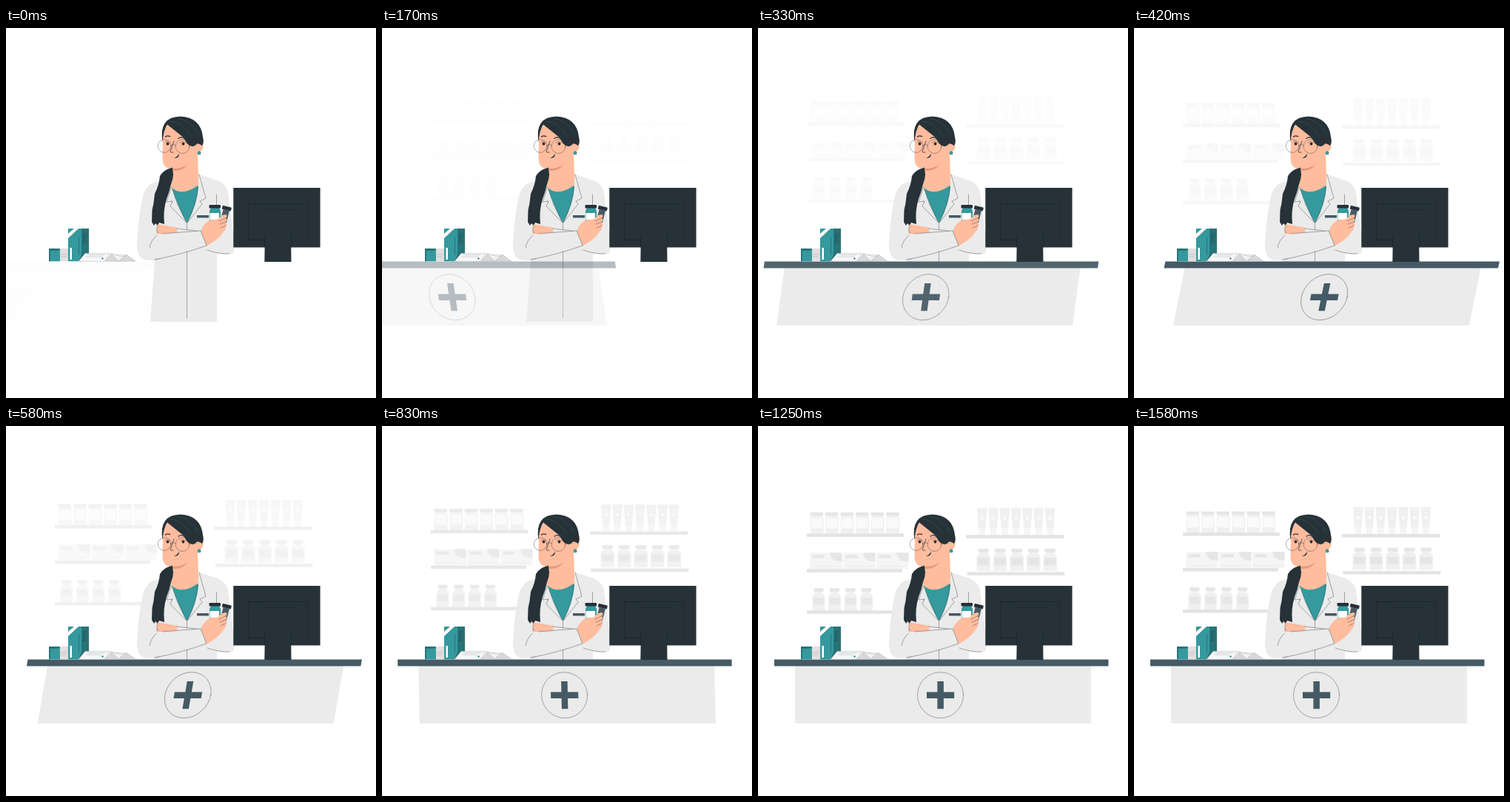
Recreate the animation shown at these times as an HTML page. Size 500x500 px, loop 1.62 s.

```html
<!DOCTYPE html>
<html lang="en">
<head>
<meta charset="utf-8">
<title>Pharmacy counter</title>
<style>
  html, body { margin: 0; width: 100%; height: 100%; overflow: hidden; background: #fff; }
  svg { display: block; width: 100%; height: 100%; }
  .dark { fill: #263238; }
  .slate { fill: #455a64; }
  .teal { fill: #35999d; }
  .skin { fill: #ffbd9e; }
  .coat { fill: #ebebeb; }
  .line { fill: none; stroke: #263238; stroke-width: .4; stroke-linecap: round; stroke-linejoin: round; }
  .soft { stroke: #8a9499; }
  .etch { stroke: #10191d; }
</style>
</head>
<body>
<svg viewBox="0 0 500 500">
  <g id="shelves"></g>

  <g id="woman">
    <path class="coat" d="M224 204 Q206 206 197 210 Q187 215 184 232 Q178 262 177 294 Q177 308 184 312 Q190 315 201 313.500 L195 397 H285 V304.500 Q300 307 307 304 Q309 300 308 284 L300 222 Q297 210 286 206 L262 198 Z"/>
    <path class="skin" d="M222 185 L259 168 L260 200 L262 220 L244 240 L222 219 Z"/>
    <path fill="#e8967a" d="M224 189 Q238 190 245 184 Q240 193 227 193 Z"/>
    <path class="teal" d="M224 216 Q238 228 259 213 L263 229 L245 263 L224 240 Z"/>
    <path class="coat" d="M223 213 L217 235 L225 234 L222 241 L244 263 Q231 239 224 215 Z M260 197 L270 230 L262 234 L265 238 L245 263 Q258 238 260 215 Z"/>
    <path class="line" d="M223.500 215 L217 235 L225 234 L222 241 L244 263 Q231 240 224 216 M261 198 L270 230 L262 234 L265 238 L245 263 Q258 238 259.500 214"/>
    <path class="line" d="M244.500 263 V392 M284.500 225 V239"/>
    <path class="slate" d="M258 253 H274 V256.500 H258 Z"/>

    <path class="skin" d="M212 140 L211.500 177 Q212 190 224 190 Q240 191 250 180 Q257 175 258 167 Q265 168 266.500 161 Q267 155 258 155 L244 132 L222 126 Z"/>
    <path class="dark" d="M211.500 154 Q206 120 236 119.500 Q263 121 266 147 Q268 155 265 159 Q260 155 257 157 Q255 161 250 159.500 Q244 158 241 149 Q230 140 218 130.500 Q213 137 211.500 154 Z"/>
    <path class="line" style="stroke:#506069" d="M222 126 Q236 126 249 145 M232 122 Q251 125 260 144"/>
    <path class="dark" d="M225 188.500 Q212 192 208 200 Q207 212 201 224 Q200 236 197.500 246 L197 262 L200 267 L202 264 L205 267 L207 263 L214 265 Q212 247 217 231 Q221 221 223 211 Q226 204 226 198 Z"/>
    <path d="M215.500 147 Q218 145 221.500 146.500 M233 149 Q238 145.500 243 151" fill="none" stroke="#263238" stroke-width="1.400" stroke-linecap="round"/>
    <circle class="dark" cx="218.500" cy="156.500" r="1.900"/>
    <circle class="dark" cx="239.500" cy="156.500" r="1.900"/>
    <path class="line" d="M215 154 Q218 152 222 155 M235 155 Q239 152 243 155"/>
    <path class="line" style="stroke-width:.8" d="M227 153 L222 167 Q223 169 226 168"/>
    <path class="dark" d="M227 175.500 Q231 175 234 169.500 Q234 177 227 175.500 Z"/>
    <g class="line">
      <circle cx="214" cy="159.500" r="8.800"/>
      <circle cx="238.500" cy="160" r="9.400"/>
      <path d="M222.500 159 Q226 156 229.500 159 M247.500 158 L258 158"/>
    </g>
    <circle class="teal" cx="261" cy="168.800" r="2.500"/>

    <path class="skin" d="M205 265 L232 270 V278 H203 Z"/>
    <path class="coat" d="M231 271 L250 274 L285 284 L308 279 V303 L270 300 L232 282 Z"/>
    <path class="line" d="M205 266 Q202 276 206 277 M231 271 L264 275 M272 300 Q289 306 302 305 M201 313 L208 311.500"/>
    <g id="vials">
      <path class="teal" d="M277 243 H288 L290 247 V264 H275 V247 Z"/>
      <rect class="dark" x="274.500" y="239" width="15.500" height="4.500" rx="1"/>
      <path fill="#fff" d="M275.500 250 H288 V259.500 H275.500 Z"/>
      <g transform="rotate(14 297 250)">
        <path class="slate" d="M292.500 246 H301 V263 H292.500 Z"/>
        <rect class="dark" x="290.500" y="241" width="12.500" height="5" rx="1"/>
      </g>
    </g>
    <path class="skin" d="M262 276 Q268 263 275 260 L287 258 Q291 252 297 252 Q300 253 297 257 Q300 259 297 262 Q300 265 297 268 Q298 272 294 275 Q288 286 270 295 Z"/>
    <path class="line" d="M288 261 L297 257 M289 265 L297 262 M290 270 L297 267"/>
    <path class="coat" d="M194 298 Q198 279 211 278 L263 274 L271 294 Q235 306 201 313 Q190 313 194 298 Z"/>
    <path class="line" d="M211 278 L263 274 L271 294 Q238 306 201 313 M194 297 Q196 286 204 280"/>
  </g>

  <g id="counter">
    <path class="coat" d="M50 324 H450 V402 H50 Z"/>
    <path class="slate" d="M22 315.400 H473.500 V324.600 H22 Z M228 359.500 H265.200 V368 H228 Z M242.400 345 H250.900 V382.300 H242.400 Z"/>
    <circle class="line" cx="246.500" cy="363.700" r="31"/>
  </g>

  <g id="monitor">
    <path class="dark" d="M307.300 216 H424.600 V296.500 H307.300 Z"/>
    <path class="line etch" d="M349 286.500 H327.500 V237.500 H407.500 V283"/>
    <path class="line etch" style="stroke-width:1.100" stroke-dasharray="0 2.800" d="M346 245.500 H393"/>
    <path class="dark" d="M350 278 H385 L385.500 316 H349.300 Z"/>
    <path class="line etch" d="M349.500 296 V280 M385.500 277 V296"/>
  </g>

  <g id="boxes">
    <path class="teal" d="M58 298 H73 V315.300 H58 Z M84 271 H102 V315.300 H84 Z"/>
    <path fill="#277378" d="M58 298 H73 L70 301 H60 V315.300 H58 Z M102 271 H112 V305 L98 315.300 L102 306 Z"/>
    <path fill="#e0e0e0" d="M73 298 H84 V315.300 H73 Z"/>
    <path class="line soft" d="M75 306 H83 M75 309 H81"/>
    <path fill="#fff" d="M84 278 L92 271 H98 L84 284 Z M86.500 297 H89 V313 H86.500 Z"/>
    <path class="line" d="M98.500 283 V306 M105 278 H109 M105 281 H109 M105 284 H109 M105 287 H109 M105 290 H109 M105 278 V291"/>
    <path fill="#f7f7f7" stroke="#9aa3a7" stroke-width=".4" d="M98 315.300 L107 304.500 H140 L133 315.300 Z"/>
    <path class="line soft" d="M110 306.500 H133 M108 309 H130 M142 306 L160 307 M149 309 H158"/>
    <path class="teal" d="M129 311 h3 v1 h-3 Z M130 310 h1 v3 h-1 Z"/>
    <path fill="#d8d8d8" stroke="#9aa3a7" stroke-width=".4" d="M134 315.300 L142 305 L152 315.300 Z M152 315.300 L163 306.500 L175 315.300 Z"/>
    <path fill="#f2f2f2" stroke="#9aa3a7" stroke-width=".4" d="M142 305 L157 309 L163 306.500 L152 315 Z"/>
  </g>
</svg>

<script>
const el = id => document.getElementById(id);
const shelves = el('shelves');
const LOOP = 1620, FPS = 24, LEAD = 33;

const add = (d, fill) => { shelves.innerHTML += `<path d="${d}" fill="${fill}"/>`; };
const box = (x, y, w, h, fill) => add(`M${x} ${y}h${w}v${h}h${-w}z`, fill);
const row = (n, x, step, draw) => { for (let i = 0; i < n; i++) draw(x + i * step); };

row(6, 71, 20.5, x => {
  add(`M${x + 1} 120h15l1.500 4v20h-17.500v-20z`, '#f0f0f0');
  box(x - .5, 115.500, 17.500, 4.500, '#e6e6e6');
  box(x + 1, 123, 15, 14, '#fafafa');
});
row(3, 70, 45, x => {
  box(x, 170, 43.500, 22, '#f5f5f5');
  add(`M${x + 27} 170h16.500v12q-15 0 -16.500 -12z`, '#e6e6e6');
  box(x + 3.500, 173, 16, 4.500, '#e6e6e6');
  box(x + 3.500, 188, 36, 1, '#ebebeb');
});
const bottle = (x, y, w, label) => {
  add(`M${x + 4} ${y + 4}h${w - 8}v3q4 1 4 5v18h${-w}v-18q0 -4 4 -5z`, '#f0f0f0');
  add(`M${x + 3} ${y}h${w - 6}q1 0 1 1v3q0 1 -1 1h${6 - w}q-1 0 -1 -1v-3q0 -1 1 -1z`, '#e6e6e6');
  box(x + 1.500, y + 12.500, w - 3, 10, label);
  box(x + 4, y + 15, w - 8, .6, '#dedede');
  box(x + 4, y + 18, w - 8, .6, '#dedede');
};
row(4, 73.500, 21.5, x => bottle(x, 218, 17, '#e8e8e8'));
row(5, 295.500, 22.500, x => bottle(x, 164.500, 18.500, '#e6e6e6'));
row(7, 296, 15.300, x => {
  add(`M${x} 109.500h13.500l-2 28h-9.500z`, '#f0f0f0');
  box(x + 2.500, 137.500, 8.500, 8.500, '#f5f5f5');
  add(`M${x + 6.200} 121h1.200v2h2v1.200h-2v2h-1.200v-2h-2v-1.200h2z`, '#fff');
});
[[66, 144, 131], [66, 192, 129], [66, 248, 129], [281, 146, 132], [282.500, 196, 132]]
  .forEach(([x, y, w]) => box(x, y, w, 4.500, '#e3e3e3'));

// cubic-bezier(.36, -.01, .5, 1.38)
function ease(x) {
  if (x <= 0) return 0;
  if (x >= 1) return 1;
  const curve = (s, a, b) => 3 * (1 - s) ** 2 * s * a + 3 * (1 - s) * s * s * b + s ** 3;
  let lo = 0, hi = 1;
  for (let i = 0; i < 24; i++) {
    const mid = (lo + hi) / 2;
    if (curve(mid, .36, .5) < x) lo = mid; else hi = mid;
  }
  return curve(lo, -.01, 1.38);
}

// The counter rushes in from the left, leans back, then settles.
function counterPose(t) {
  if (t < 600) {
    const e = ease(t / 600);
    return { x: -250 * (1 - e), skew: 20 - 30 * e, opacity: e };
  }
  const skew = t < 800 ? -10 + 12 * ease((t - 600) / 200) : 2 - 2 * ease((t - 800) / 200);
  return { x: 0, skew, opacity: 1 };
}

function place(node, transform, opacity) {
  node.setAttribute('transform', transform);
  node.setAttribute('opacity', Math.max(0, Math.min(1, opacity)));
}

const start = performance.now();
function draw() {
  const now = (performance.now() - start) % LOOP;
  const t = Math.floor((now + 6) * FPS / 1000) * 1000 / FPS + LEAD;
  const c = counterPose(t);
  place(el('counter'), `translate(${c.x} 359) skewX(${c.skew}) translate(0 -359)`, c.opacity);
  const e = ease(t / 1600);
  place(shelves, `translate(0 ${20 * (e - 1)})`, e);
  requestAnimationFrame(draw);
}
draw();
</script>
</body>
</html>
```
